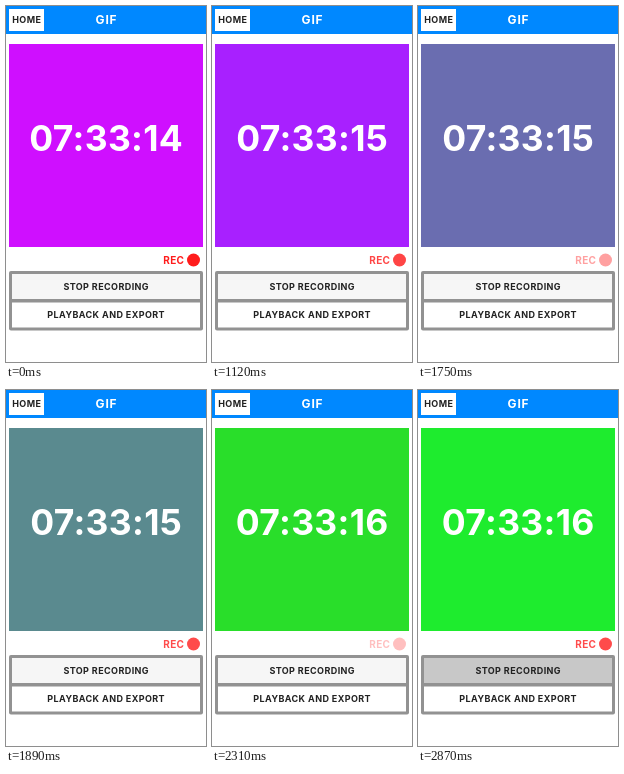
Recreate the animation shown at these times as an HTML page. Size 200x356 px, loop 2.94 s.

```html
<!DOCTYPE html>
<html lang="en">
<head>
<meta charset="utf-8">
<title>Recorder</title>
<style>
  html, body { margin: 0; width: 100%; height: 100%; overflow: hidden; background: #fff; }
  svg { display: block; width: 100%; height: 100%; }
  text { font-family: Inter, "Open Sans", sans-serif; font-weight: 700; }
  .label { font-size: 9px; letter-spacing: .4px; fill: #222; text-anchor: middle; }
</style>
</head>
<body>
<svg viewBox="0 0 200 356">
  <rect width="200" height="356" fill="#fff"/>
  <rect width="200" height="28" fill="#08f"/>
  <rect x="3" y="3" width="35" height="22" fill="#fff"/>
  <text class="label" x="20.8" y="17.4">HOME</text>
  <text x="100.5" y="18.3" font-size="12" letter-spacing=".8" text-anchor="middle" fill="#fff">GIF</text>

  <rect id="panel" x="3" y="38" width="194" height="203"/>
  <text id="clock" x="100.2" y="145" font-size="35.5" letter-spacing=".3" text-anchor="middle" fill="#fff"></text>

  <g id="rec" fill="#f00">
    <text x="157.3" y="257.6" font-size="10" letter-spacing=".3">REC</text>
    <circle cx="187.5" cy="254" r="6.5"/>
  </g>

  <rect x="3" y="265" width="194" height="59.5" rx="2" fill="#929292"/>
  <rect id="stop" x="6" y="268" width="188" height="25"/>
  <rect x="6" y="296.5" width="188" height="25" fill="#fff"/>
  <text class="label" x="100.2" y="284.2">STOP RECORDING</text>
  <text class="label" x="100.2" y="312.2">PLAYBACK AND EXPORT</text>
</svg>
<script>
const SECOND = 980, LOOP = 3 * SECOND, STEP = 70;
const MAGENTA = [207, 15, 255], VIOLET = [144, 43, 255], GREEN = [41, 222, 42], LIME = [30, 236, 46];
const $ = id => document.getElementById(id);
const panel = $('panel'), clock = $('clock'), rec = $('rec'), stop = $('stop');

const ramp = (t, from, to) => Math.min(1, Math.max(0, (t - from) / (to - from)));
const mix = (a, b, p) => a.map((v, i) => v + (b[i] - v) * p);
const rgb = c => `rgb(${c.map(Math.round).join()})`;

function panelColor(t) {
  const early = mix(MAGENTA, VIOLET, ramp(t, 0, 1420) ** 2);
  const late = mix(GREEN, LIME, ramp(t, 2310, 2870));
  return mix(early, late, ramp(t, 1420, 2310));
}

// One blink per second, brightest just after the clock ticks
function blink(t) {
  const phase = (t - 40) / SECOND;
  return (2 * Math.abs(phase - Math.round(phase)) - 1) ** 2 ** .7;
}

function pulse(t) {
  const phase = (t - 40) / SECOND;
  return Math.pow(1 - 2 * Math.abs(phase - Math.round(phase)), 1.4);
}

function draw(t) {
  const grey = 246 - 46 * ramp(t, 2660, 2800);
  panel.setAttribute('fill', rgb(panelColor(t)));
  clock.textContent = '07:33:' + (14 + Math.floor(t / SECOND));
  rec.setAttribute('opacity', pulse(t));
  stop.setAttribute('fill', rgb([grey, grey, grey]));
}

const start = performance.now();
function tick() {
  const t = (performance.now() - start) % LOOP;
  draw(Math.floor(t / STEP) * STEP);
  requestAnimationFrame(tick);
}
tick();
</script>
</body>
</html>
```
